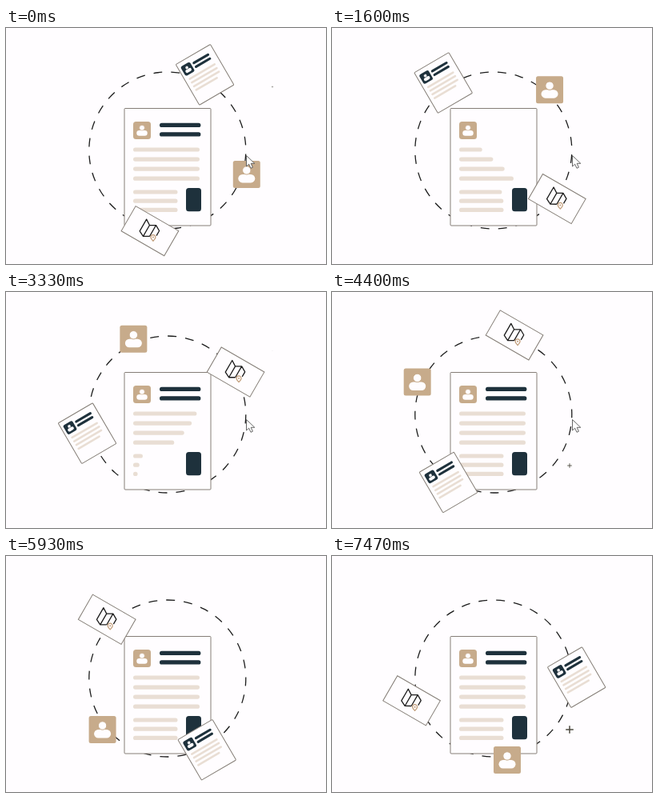
Write an HTML page that moves like this. It is 400 px wide and 295 px high and loops after 7540 ms.

```html
<!DOCTYPE html>
<html lang="en">
<head>
<meta charset="utf-8">
<title>Orbiting documents</title>
<style>
html, body { margin: 0; width: 100%; height: 100%; overflow: hidden; background: #fffdff; }
svg { display: block; width: 100vw; height: 100vh; color: #c7ab8b; }
.sheet { fill: #fffdff; stroke: #857e77; }
.line { fill: none; stroke-linecap: round; }
.dark { stroke: #1e313c; }
.light { stroke: #e9ded4; }
</style>
</head>
<body>
<svg viewBox="0 0 400 295">
  <defs>
    <g id="person">
      <rect x="-10.5" width="21" height="10.5" rx="5.2" fill="#fffdff"/>
      <circle cy="-5" r="5.2" fill="#fffdff" stroke="currentColor"/>
    </g>
  </defs>

  <circle id="ring" r="98" fill="none" stroke="#1c1c1c" stroke-width="1.3"
    pathLength="28" stroke-dasharray=".5 .5" stroke-dashoffset=".25"/>

  <rect class="sheet" x="148" y="100.5" width="108" height="146.5" rx="1"/>
  <g transform="translate(170 128)">
    <rect x="-11" y="-11" width="22" height="22" rx="3.5" fill="currentColor"/>
    <use href="#person" transform="scale(.64)"/>
  </g>
  <rect x="225" y="200" width="19" height="29.3" rx="3.5" fill="#1e313c"/>
  <g id="text"></g>

  <g id="paper">
    <g transform="rotate(-30.3)">
      <rect class="sheet" x="-25" y="-29.3" width="50" height="58.6" rx="1"/>
      <g transform="translate(-15 -17)" color="#1e313c">
        <rect x="-6.7" y="-6.7" width="13.4" height="13.4" rx="2.5" fill="currentColor"/>
        <use href="#person" transform="scale(.39)"/>
      </g>
      <path class="line dark" stroke-width="3.1" d="M-4.5-19.6H16M-4.5-14.2H15.5"/>
      <path class="line light" stroke-width="2.6" d="M-19-5H17M-19 .3H17M-19 5.6H17M-19 11H11"/>
    </g>
  </g>

  <g id="card">
    <g transform="rotate(30)">
      <rect class="sheet" x="-31" y="-18" width="62" height="36"/>
      <path fill="none" stroke="#1c1c1c" stroke-width="1.3" stroke-linejoin="round"
        d="M3 6L-4 10L-11 6.5V-10.5L-4-6L3-10L10-6V1M-4-6V10M3-10V6"/>
    </g>
    <path d="M4 12.6Q1 9.4 1 7.9A3 3 0 0 1 7 7.9Q7 9.4 4 12.6Z" fill="#fffdff" stroke="#c09c78" stroke-width="1.2"/>
    <circle cx="4" cy="7.9" r="1" fill="#c09c78"/>
  </g>

  <g id="avatar">
    <rect x="-17" y="-17" width="34" height="34" rx="2.5" fill="currentColor"/>
    <use href="#person"/>
  </g>

  <g id="pluses"></g>
  <path id="cursor" d="M0 0V13.5L3.2 10.7L5.5 15.8L7.9 14.7L5.7 9.8H10.3Z"
    fill="#fff" stroke="#555" stroke-width=".9" stroke-linejoin="round"/>
</svg>

<script>
const LOOP = 7540, FPS = 15;
const $ = id => document.getElementById(id);
const clamp = v => Math.min(1, Math.max(0, v));
const ease = u => u < .5 ? 2 * u * u : 1 - 2 * (1 - u) ** 2;
const place = (el, x, y, rest = "") => el.setAttribute("transform", `translate(${x} ${y}) ${rest}`);

function add(parent, attrs) {
  const path = document.createElementNS("http://www.w3.org/2000/svg", "path");
  for (const k in attrs) path.setAttribute(k, attrs[k]);
  return $(parent).appendChild(path);
}

// Blocks of text; each line is erased and rewritten a moment after the one above
const blocks = [
  { x: 194.6, width: 46.2, y: 121.4, gap: 11.5, count: 2, erase: .4, write: 2.2, tone: "dark" },
  { x: 161.6, width: 77.8, y: 152, gap: 12.05, count: 4, erase: 1.05, write: 2.57, tone: "light" },
  { x: 161.6, width: 50.3, y: 205, gap: 11.2, count: 3, erase: 1.47, write: 3.1, tone: "light" }
];
const lines = blocks.flatMap(b => Array.from({ length: b.count }, (_, i) => ({
  x: b.x, width: b.width, y: b.y + i * b.gap, erase: b.erase + i * .09, write: b.write + i * .09,
  el: add("text", { class: "line " + b.tone, "stroke-width": 5.2 })
})));

const orbits = [
  { id: "paper", cx: 202, cy: 151, r: 103.7, start: 63.3 },
  { id: "card", cx: 198.5, cy: 152.5, r: 102.9, start: -100.4 },
  { id: "avatar", cx: 201.8, cy: 153, r: 103.4, start: -16.8 }
];

// Plus signs pop up around the given moments
const POP = .9;
const pluses = [
  { x: 333, y: 73.5, peaks: [.38, 2.9, 5.25] },
  { x: 102.3, y: 69.3, peaks: [2.1, 6.5] },
  { x: 297, y: 217, peaks: [4.13, 7.45] }
];
for (const p of pluses)
  p.el = add("pluses", { d: "M-4.8 0H4.8M0-4.8V4.8", stroke: "#4c493f", "stroke-width": 1.5 });

function draw(t) {
  for (const { x, y, width, erase, write, el } of lines) {
    const part = 1 - ease(clamp((t - erase) / .9)) + ease(clamp((t - write) / .9));
    el.setAttribute("d", part > .002 ? `M${x} ${y}h${width * part}` : "");
  }

  // Steady turn in degrees, resting for about one step
  const turn = 40 * t - 2.3 * clamp((t - 2.4) * FPS);
  place($("ring"), 201.8, 153, `rotate(${-turn - 7})`);
  for (const { id, cx, cy, r, start } of orbits) {
    const a = (start + turn) * Math.PI / 180;
    place($(id), cx + r * Math.cos(a), cy - r * Math.sin(a));
  }

  for (const { x, y, peaks, el } of pluses) {
    const away = Math.min(...peaks.map(p => Math.abs(t - p)));
    place(el, x, y, `scale(${Math.cos(Math.PI * Math.min(.5, away / POP))})`);
  }

  const leave = clamp((t - 4.45) / .4);
  place($("cursor"), 300.5 + 14 * leave, 159.5 + 8 * leave);
  $("cursor").setAttribute("opacity", 1 - leave);
}

const begin = performance.now();
function tick() {
  const ms = (performance.now() - begin) % LOOP;
  draw(Math.floor((ms + 4) * FPS / 1000) / FPS);
  requestAnimationFrame(tick);
}
tick();
</script>
</body>
</html>
```
